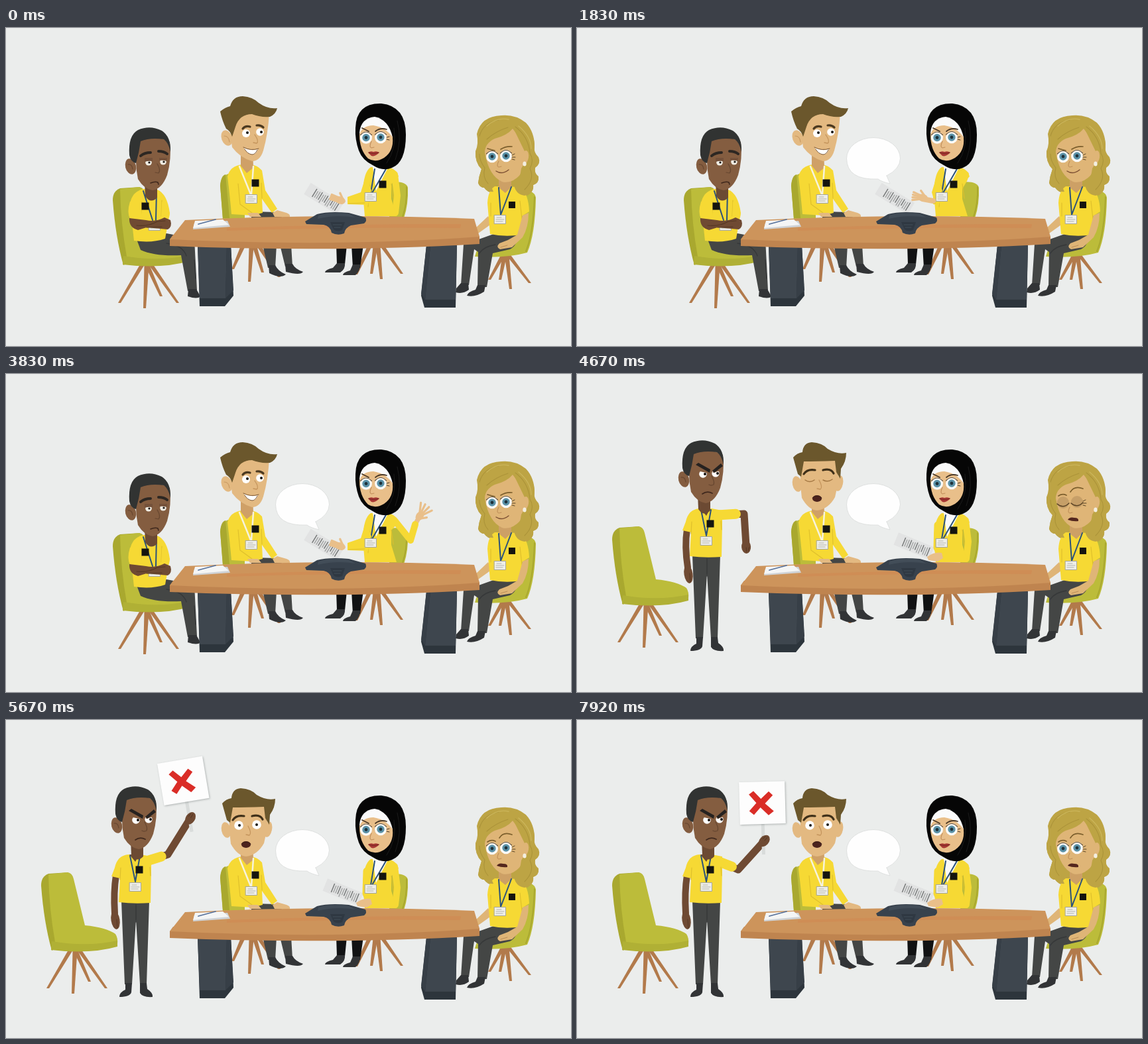
Animation, 852 px wide and 480 px high, one loop 8 s. Source, as an HTML page with a canvas:

```html
<!DOCTYPE html>
<html lang="en">
<head>
<meta charset="utf-8">
<title>Team meeting</title>
<style>
html, body { margin: 0; width: 100%; height: 100%; overflow: hidden; background: #ebedec; }
canvas { display: block; width: 100vw; height: 100vh; }
</style>
</head>
<body>
<canvas id="stage"></canvas>
<script>
const W = 852, H = 480, LOOP = 8000, STAND = 4250;
const canvas = document.getElementById('stage');
const ctx = canvas.getContext('2d');
const dpr = window.devicePixelRatio || 1;
canvas.width = W * dpr;
canvas.height = H * dpr;

const YELLOW = '#f6d934', FOLD = '#dfc02c', PANTS = '#444645', SHOE = '#323436', NAVY = '#2c527a';
const BROWN = '#845d40', ARM = '#6f4a33', TAN = '#e3b981', FAIR = '#e9bf8a', GOLD = '#dfb577';
const GREEN = '#bcbc3a', GREEN_DARK = '#a9a82f', WOOD = '#b27a4b', HAIR = '#bda444';

// Drawing helpers
function fill(color, d) {
  ctx.fillStyle = color;
  ctx.fill(new Path2D(d));
}
function line(color, width, d) {
  ctx.strokeStyle = color;
  ctx.lineWidth = width;
  ctx.lineCap = ctx.lineJoin = 'round';
  ctx.stroke(new Path2D(d));
}
function oval(color, x, y, rx, ry = rx, turn = 0) {
  ctx.fillStyle = color;
  ctx.beginPath();
  ctx.ellipse(x, y, rx, ry, turn, 0, Math.PI * 2);
  ctx.fill();
}
function at(x, y, turn, draw, scale = 1) {
  ctx.save();
  ctx.translate(x, y);
  ctx.rotate(turn);
  ctx.scale(scale, scale);
  draw();
  ctx.restore();
}

// Timing helpers
const lerp = (a, b, k) => a + (b - a) * k;
function ramp(t, from, to) {
  const k = Math.min(1, Math.max(0, (t - from) / (to - from)));
  return k * k * (3 - 2 * k);
}
function pose(t, keys) {
  let i = 0;
  while (i < keys.length - 2 && t >= keys[i + 1][0]) i++;
  const [t0, ...a] = keys[i], [t1, ...b] = keys[i + 1];
  const k = ramp(t, t0, t1);
  return a.map((v, n) => lerp(v, b[n], k));
}

// Shared parts
function badge(x, y) {
  ctx.fillStyle = '#eeeee8';
  ctx.fillRect(x - 8.5, y - 6.5, 17, 13);
  ctx.strokeStyle = '#a5a69f';
  ctx.lineWidth = 1;
  ctx.strokeRect(x - 8.5, y - 6.5, 17, 13);
  line('#b4b5b0', 1, `M${x - 5} ${y - 3}h7M${x - 6} ${y}h12M${x - 6} ${y + 3}h10`);
}
function emblem(x, y, size = 11) {
  ctx.fillStyle = '#15150f';
  ctx.fillRect(x - size / 2, y - size / 2, size, size);
}
function leg(x1, y1, x2, y2) {
  fill(WOOD, `M${x1 - 3.5} ${y1}H${x1 + 3.5}L${x2 + 2} ${y2}H${x2 - 2}Z`);
}
function hand(x, y, turn, spread, skin, reach = 12) {
  at(x, y, turn, () => {
    oval(skin, 0, 0, 8, 5.5);
    for (let i = -1.5; i <= 1.5; i++) {
      const a = i * spread;
      line(skin, 3.2, `M4 ${i * 2}L${5 + reach * Math.cos(a)} ${i * 2 + reach * Math.sin(a)}`);
    }
    line(skin, 3.2, 'M-2 4L4 10');
  });
}
function bigEye(x, y, shut) {
  if (shut) {
    oval('#c69f68', x, y, 9, 9);
    line('#5b4426', 1.5, `M${x - 9} ${y + 2}Q${x} ${y + 10} ${x + 9} ${y + 1}`);
    return;
  }
  oval('#fbfbf8', x, y, 9, 9.2);
  oval('#5b92a8', x, y, 5.7);
  oval('#20323a', x, y, 2.4);
  line('#594631', 1.1, `M${x - 8.5} ${y - 4}Q${x} ${y - 13} ${x + 8.5} ${y - 4}`);
}

function sideChair(x, y) {
  at(x, y, 0, () => {
    leg(105, 348, 126, 395);
    leg(97, 348, 63, 405);
    leg(104, 349, 101, 413);
    leg(111, 348, 151, 405);
    fill(GREEN_DARK, 'M53 250Q53 236 64 232L94 230L104 330L69 348Q57 305 53 250Z');
    fill(GREEN, 'M64 233L93 230Q100 231 102 240L119 310Q151 313 165 323Q169 329 168 338Q124 350 74 335Q65 285 64 233Z');
    fill('#b0b035', 'M69 334Q121 343 168 333V342Q126 354 68 347Z');
  });
}

function darkHead(x, y, angry) {
  at(x, y, 0, () => {
    fill('#6c4a33', 'M182 181L201 182L201 206Q191 216 183 204Z');
    oval(BROWN, 161, 159, 8, 12, -0.25);
    line('#674730', 1.2, 'M157 156Q163 155 164 163');
    fill(BROWN, 'M172 122Q166 151 172 178Q181 193 194 195Q208 193 216 172Q223 147 220 122Q198 109 172 122Z');
    fill('#313332', 'M159 142Q157 112 172 104Q190 96 208 105Q222 114 221 137Q218 123 211 118Q190 115 176 121Q174 137 169 154Q161 152 159 142Z');
    if (angry) {
      oval('#fff', 190, 151, 5.8);
      oval('#fff', 209, 150, 5.6);
      fill(BROWN, 'M181 141L202 149L199 150L181 146ZM204 148L217 141L216 146L206 149Z');
      oval('#16110d', 193, 151, 2);
      oval('#16110d', 212, 150, 2);
      fill('#262220', 'M179 137L183 134L201 144L200 149ZM204 146L217 135L220 139L207 149Z');
      line('#674730', 1.3, 'M203 154Q208 163 206 167Q202 169 199 167');
      line('#3f281d', 1.7, 'M189 181Q196 176 204 180');
    } else {
      oval('#f0ede4', 188, 153, 4.8, 4.6);
      oval('#f0ede4', 210, 152, 4.8, 4.6);
      fill('#74513a', 'M182 146H194V151Q188 150 182 152ZM204 146H216V151Q210 149 204 150Z');
      oval('#16110d', 189, 153, 1.6);
      oval('#16110d', 211, 152, 1.6);
      line('#2d2722', 4, 'M176 143Q182 138 191 138M203 136Q211 136 216 140');
      line('#674730', 1.2, 'M201 155Q207 165 203 169L198 168');
      line('#3f281d', 1.6, 'M191 184Q198 181 202 183L203 186');
    }
  });
}

function seatedMan() {
  sideChair(108, 10);
  fill(PANTS, 'M197 319L242 310L284 318L288 396L274 397L264 343Q225 345 203 335Z');
  line('#363839', 1.4, 'M242 325Q267 328 272 344M284 350L286 378');
  fill(SHOE, 'M275 394L287 394L293 405Q289 410 274 405Z');
  fill(YELLOW, 'M207 243Q190 247 187 265L193 321Q220 325 240 318L247 279Q243 250 228 244Z');
  line(FOLD, 1.2, 'M205 262L203 287M235 260L234 284');
  line(NAVY, 2, 'M207 246L221 290M227 246L226 290');
  badge(224, 299);
  emblem(210, 269);
  fill(YELLOW, 'M187 262Q182 278 187 288L204 290L204 262ZM235 262L247 279L246 286L234 288Z');
  fill(ARM, 'M186 287Q185 301 199 305L212 301L244 304Q251 300 248 290L239 286Q226 293 211 290Z');
  line('#553723', 1.2, 'M197 298Q215 300 228 292L240 291M212 301L235 300');
  darkHead(27, 50, false);
}

function sign(x, y, turn, scale) {
  at(x, y, turn, () => {
    ctx.fillStyle = '#d9dcdb';
    ctx.fillRect(-2.5, -30, 5, 49);
    ctx.save();
    ctx.shadowColor = 'rgba(60,70,70,.35)';
    ctx.shadowBlur = 3 * dpr;
    ctx.shadowOffsetX = ctx.shadowOffsetY = dpr;
    ctx.fillStyle = '#fdfdfd';
    ctx.fillRect(-34.5, -91, 69, 64);
    ctx.restore();
    fill('#da2d27', 'M-20 -72L-13 -77L-2 -65L10 -76L16 -70L4 -58L17 -46L9 -40L-3 -52L-13 -41L-20 -47L-9 -59Z');
  }, scale);
}

function standingMan(t) {
  sideChair(0, 0);
  const [ex, ey, hx, hy, turn] = pose(t, [
    [4250, 224, 246, 230, 290, -30], [4600, 252, 211, 255, 259, -30],
    [5060, 252, 211, 255, 259, -30], [5420, 243, 200, 276, 143, -14],
    [5670, 244, 203, 277, 150, -9.5], [5880, 243, 226, 281, 184, -1.5],
    [LOOP, 243, 226, 281, 184, -1.5]
  ]);
  const lift = ramp(t, 5000, 5350);

  line(ARM, 10, `M166 234Q162 260 ${lerp(167, 164, lift)} 292`);
  oval(ARM, lerp(168, 165, lift), 302, 6.5, 14, -0.15);
  line('#553723', 1, `M${lerp(170, 167, lift)} 301l1 13`);
  fill(PANTS, 'M174 273L216 273L212 399L202 399L196 301L190 399L179 399Z');
  line('#363839', 1.5, 'M196 279V305');
  fill(SHOE, 'M180 397H190L189 411Q187 418 171 418Q171 411 180 407ZM202 397H212L213 406Q222 412 221 418Q206 419 202 412Z');

  line(ARM, 11, `M215 213L${ex} ${ey}L${hx} ${hy}`);
  const sx = lerp(215, ex, 0.66), sy = lerp(212, ey, 0.66);
  line(YELLOW, 15, `M212 213L${sx} ${sy}`);
  fill(YELLOW, 'M185 203Q168 204 164 223L159 236L172 239L170 275Q193 278 218 276L219 226L219 206L203 203Z');
  line(FOLD, 1.2, 'M173 223L172 241M217 222L218 235');
  fill('#6c4a33', 'M186 203H201L195 214Z');
  line(NAVY, 2, 'M187 205L195 244M202 205L195 244');
  badge(195, 252);
  emblem(201, 226);
  darkHead(6 * lift, 0, true);
  if (t >= 5080) sign(hx, hy, turn * Math.PI / 180, ramp(t, 5060, 5300));
  at(hx, hy, Math.atan2(hy - ey, hx - ex), () => {
    oval(ARM, 2, 0, 10, 7);
    line('#553723', 1, 'M3 -4L8 -3M3 0L9 0');
  });
}

function officeMan(shocked, blink) {
  leg(357, 330, 342, 364);
  leg(370, 330, 367, 383);
  leg(375, 330, 387, 369);
  leg(382, 330, 412, 376);
  fill(GREEN, 'M323 238Q324 222 339 219L360 218V290H327Z');
  fill(GREEN_DARK, 'M323 238Q324 223 331 221L337 287H327Z');
  fill(PANTS, 'M370 277L409 278L418 288H370ZM387 327H408L406 362H395ZM413 327H430L432 360H421Z');
  fill(SHOE, 'M396 358H406Q410 367 422 372Q414 379 397 370ZM421 356H432Q436 364 448 368Q444 374 422 368Z');
  fill(YELLOW, 'M356 206Q338 208 334 224Q338 258 340 281L372 283L387 279L386 258L401 279L409 273L391 245L386 215Q379 207 369 206Z');
  line(FOLD, 1.2, 'M350 235L353 266L371 279M385 234L386 257');
  fill(TAN, 'M364 279L380 279L385 285H368ZM402 279L409 275L423 279Q429 281 428 285L405 285Z');
  fill('#cfa067', 'M354 181H372L373 211L363 219L354 208Z');
  line('#f7f3dc', 2.5, 'M352 209L369 251M373 209L370 251');
  badge(370, 258);
  emblem(376, 234);

  if (shocked) {
    oval(TAN, 332, 166, 7, 12, -0.2);
    oval(TAN, 395, 165, 6, 12, 0.2);
    fill(TAN, 'M338 128Q335 158 339 187Q349 205 362 206Q379 204 389 186Q396 160 394 128Z');
    fill('#6b572c', 'M326 126Q332 119 340 118Q341 104 354 103Q370 104 378 113Q393 122 406 119Q406 132 398 143L397 158L391 148L389 131Q360 132 342 132L338 155L333 151Z');
    if (blink) {
      line('#a57843', 1.5, 'M344 160Q351 165 358 160M371 160Q378 164 385 159');
    } else {
      oval('#fff', 351, 159, 6.8);
      oval('#fff', 378, 158, 6.8);
      oval('#17130e', 352, 159, 2);
      oval('#17130e', 378, 158, 2);
    }
    line('#3f3019', 3.2, 'M342 151Q347 143 359 145M371 145Q383 142 387 150');
    line('#c4945c', 1.3, 'M365 160Q371 171 367 174L362 173');
    oval('#4c231d', 362, 188, 7, 5);
    line('#3d2017', 1, 'M355 187Q362 181 369 187');
  } else {
    oval(TAN, 333, 166, 8, 12, -0.35);
    line('#c99a63', 1.2, 'M329 163Q336 163 337 172');
    fill(TAN, 'M342 130Q337 159 341 180Q353 196 371 201Q383 201 388 185Q395 161 397 128Z');
    fill('#6b572c', 'M323 126Q330 120 338 118Q342 103 357 103Q372 104 381 113Q395 123 409 121Q407 130 398 134Q383 135 371 130Q352 130 346 149L341 164Q338 155 332 152Q326 140 323 126Z');
    oval('#fff', 362, 159, 6);
    oval('#fff', 383, 157, 5.8);
    oval('#17130e', 364, 158, 2);
    oval('#17130e', 385, 157, 2);
    line('#4b3920', 3.2, 'M357 152Q361 147 368 149M378 147Q384 146 388 150');
    line('#c4945c', 1.3, 'M375 161Q382 171 378 174L373 173');
    fill('#fff', 'M359 181Q369 186 380 183Q377 192 370 191Q362 189 359 181Z');
    line('#7a5634', 1, 'M358 180Q369 186 381 182M360 183Q364 190 371 191Q376 191 379 184');
  }
}

function report(x, y, turn) {
  at(x, y, turn, () => {
    ctx.fillStyle = '#e2e3e3';
    ctx.fillRect(-30, -10, 58, 20);
    for (let i = 0; i < 13; i++) {
      ctx.fillStyle = i % 3 ? '#a1a3a3' : '#717474';
      ctx.fillRect(-18 + i * 3.3, -7 + (i * 5) % 3, 1.4, 14 - (i * 7) % 4);
    }
  });
}

function speaker(t) {
  const late = t >= STAND;
  const open = late ? 0 : ramp(t, 1350, 1650) * (1 - ramp(t, 2350, 2700));
  const wave = late ? 0 : ramp(t, 3050, 3400);
  leg(548, 330, 528, 372);
  leg(557, 330, 551, 371);
  leg(561, 330, 566, 379);
  leg(568, 330, 597, 371);
  fill(GREEN, 'M578 233Q603 230 606 241Q607 266 600 287H578Z');
  line(GREEN_DARK, 2, 'M604 240Q605 265 598 285');
  fill('#111213', 'M498 327H514L511 357H499ZM521 327H539L534 362H523Z');
  fill(SHOE, 'M499 355H511Q512 364 504 369L481 369Q481 365 493 362ZM523 357H534Q534 367 527 373L508 373Q508 369 519 366Z');

  // Far arm: at rest, tucked behind while the near hand opens, or raised
  const ex = lerp(lerp(590, 584, open), 610, wave), ey = lerp(lerp(253, 228, open), 251, wave);
  const hx = lerp(lerp(587, 577, open), 617, wave), hy = lerp(lerp(279, 240, open), 227, wave);
  if (wave > 0.05) {
    const sway = Math.sin((t - 3830) / 130) * 0.12 * wave;
    hand(hx + 7 * wave, hy - 13 * wave, lerp(1.5, -0.95, wave) + sway, 0.36, FAIR, 14);
    line(FAIR, 7, `M${hx} ${hy}l${6 * wave} ${-11 * wave}`);
  }
  line(YELLOW, 10, `M586 221L${ex} ${ey}L${hx} ${hy}`);
  fill(YELLOW, 'M550 210Q539 217 538 249L541 284H589L581 258L581 236L592 224Q589 214 580 211Z');
  line(FOLD, 1.1, 'M581 235L584 257M549 237L546 270');
  fill('#fafafa', 'M553 209H577L558 246Z');
  line(NAVY, 2, 'M556 213L550 249M574 211L552 249');
  badge(550, 255);
  emblem(568, 236);

  fill('#060606', 'M527 151Q528 113 566 114Q603 118 603 161Q603 203 582 211Q568 217 553 207Q537 199 532 185Q526 168 527 151Z');
  line('#1b1b1b', 1, 'M585 151Q590 180 574 204M590 140Q598 170 587 199');
  fill('#fafafa', 'M533 158Q535 136 556 134Q577 138 583 165L570 170H535Z');
  fill(FAIR, 'M533 161Q537 147 554 147Q573 150 583 165Q585 186 570 196Q557 204 546 197Q533 184 533 161Z');
  bigEye(543, 165.5, false);
  bigEye(565, 165, false);
  line('#4a3826', 1.8, 'M537 151L547 156M557 156Q564 150 574 153');
  line('#4a3826', 1, 'M574 165L578 164M574 168L578 169');
  line('#c28f5c', 1.2, 'M551 171Q547 180 551 181L555 180');
  fill('#a83834', 'M546 188Q550 185 554 187Q559 185 563 188Q556 195 551 193Z');
  line('#72251f', 1, 'M547 188Q554 191 562 188');

  if (late) {
    report(509, 260, 0.39);
    line(YELLOW, 11, 'M544 228L543 262L548 272');
    badge(550, 255);
    fill(FAIR, 'M528 276Q539 268 550 270L552 278L544 283L530 281Z');
    return;
  }
  report(480, 258, 0.55);
  const cuff = lerp(515, 537, open);
  fill(YELLOW, `M543 222L535 248L${cuff} 255L${cuff} 266L546 267L551 245Z`);
  line(FOLD, 1, `M${cuff + 2} 265L541 264`);
  badge(550, 255);
  if (open > 0.05) line(FAIR, 8, `M${cuff} 261L${cuff - 16 * open} 258`);
  hand(lerp(504, 521, open), lerp(260, 256, open), lerp(3.5, 3.3, open), lerp(0.04, 0.2, open), FAIR, 10);
}

function blonde(upset, blink) {
  leg(750, 342, 729, 380);
  leg(752, 342, 745, 380);
  leg(755, 342, 761, 394);
  leg(757, 342, 790, 385);
  fill(GREEN, 'M772 245Q797 243 799 256Q798 312 786 339Q753 348 707 345L714 323L768 320Z');
  line(GREEN_DARK, 2, 'M797 255Q795 311 784 337');
  fill(PANTS, 'M710 320L738 310L770 312Q772 328 760 334L734 340L725 391H711L712 338L706 334L698 388H686L690 326Z');
  line('#363839', 1.3, 'M714 340Q720 330 738 327');
  fill(SHOE, 'M686 385H697L698 395Q689 402 678 399L679 393ZM711 388H723L721 398Q707 407 695 404Q697 398 708 395Z');
  fill(GOLD, 'M727 284L733 295L712 310L708 302Z');
  fill(HAIR, 'M747 132Q716 133 710 160Q713 175 708 186Q707 203 717 213Q713 224 712 234Q717 242 721 241Q727 250 737 248L761 237Q767 256 781 255Q797 249 795 237Q804 234 803 224Q796 219 798 210Q807 205 803 195Q795 187 797 179Q797 157 784 143Q768 130 747 132Z');
  fill(YELLOW, 'M737 239Q727 245 726 264L730 311Q753 316 777 312L778 284L789 277Q788 251 776 240Z');
  line(FOLD, 1.2, 'M775 261L778 288M731 264L731 284');
  fill(GOLD, 'M779 283L788 279Q788 301 779 316L763 331L745 334Q738 331 744 325L757 320L771 312Z');
  line('#b98d58', 1, 'M746 331L756 328');
  fill('#cda066', 'M743 225H762V240L753 249L743 241Z');
  line(NAVY, 2, 'M743 241L746 282M762 240L746 282');
  badge(745, 289);
  emblem(763, 267, 10);
  fill(GOLD, 'M722 188Q722 174 737 167Q756 162 764 152Q777 167 783 187Q784 208 776 221Q762 236 748 232Q728 223 722 188Z');
  fill(HAIR, 'M764 149L783 145Q798 163 797 180Q795 188 803 196Q806 206 798 211Q796 219 803 225Q804 234 795 237Q796 250 782 253Q768 251 766 236Q776 226 777 212L783 202L782 186ZM722 178Q717 193 724 211Q736 224 730 236L735 247Q727 248 721 241Q714 241 712 234Q713 224 717 213Q707 203 708 186Z');
  oval(GOLD, 783, 195, 5, 10, 0.15);
  line('#ab9339', 1.1, 'M714 163Q720 142 743 139M725 168Q738 156 757 150M768 149Q788 164 790 189Q797 200 790 212Q798 228 782 244M714 190Q714 201 722 211Q718 225 727 235');
  line('#cbb55a', 1.4, 'M725 148Q740 134 758 138M773 148Q792 164 792 182');
  oval('#f3eee0', 782, 205, 2.7, 3.5);
  bigEye(733, 194, blink);
  bigEye(754, 193, blink);
  line('#594527', 1, 'M763 192L767 190M763 195L768 195M763 198L767 199');
  line('#c0905a', 1.2, 'M743 201Q739 209 743 210L747 209');
  if (upset) {
    line('#7b5e2c', 1.7, 'M726 184Q732 180 738 183M744 178Q750 168 763 173');
    fill('#54271e', 'M740 220Q743 215 750 217Q757 217 756 222Q748 223 740 220Z');
  } else {
    line('#7b5e2c', 1.7, 'M726 182L737 185M746 183Q754 178 763 179');
    line('#7d5033', 1.4, 'M739 216Q748 222 758 214');
  }
}

function table() {
  fill('#2d353c', 'M289 328H339L343 404L330 420H292Z');
  fill('#3e464e', 'M289 328H333L331 408H292Z');
  fill('#373f47', 'M333 328H339L343 396L331 408Z');
  fill('#2d353c', 'M634 328H680L678 422H631L626 404Z');
  fill('#3e464e', 'M640 328H680L678 410H632Z');
  fill('#373f47', 'M634 328H640L632 410L626 401Z');
  fill('#bf844f', 'M247 319L252 312L709 305L714 315V326Q500 339 247 329Z');
  fill('#cd945b', 'M270 290Q490 279 706 288L714 315Q500 331 247 319Z');
  fill('#cf8d55', 'M333 302Q517 295 686 296L685 302Q510 300 333 306Z');
  fill('#cfd3d7', 'M284 294L334 291L338 300L282 304Z');
  fill('#f4f5f5', 'M285 291L327 289L336 297L282 302Z');
  line('#55709a', 1.8, 'M290 296L316 289');
  fill('#38424d', 'M451 292L469 281Q487 276 517 279L542 286Q545 291 540 295L520 298Q511 302 510 310Q500 314 491 309Q489 299 479 297L453 296Z');
  fill('#424d58', 'M471 283Q493 276 518 281L527 286Q498 281 470 288Z');
  fill('#2f3842', 'M489 293L511 293L507 305Q499 308 494 304Z');
  line('#48535e', 0.8, 'M493 297H506M495 301H504');
}

function bubble(t) {
  const size = ramp(t, 920, 1150);
  if (!size) return;
  at(472, 235, 0, () => {
    const d = 'M-5 -12L0 0Q-13 -3 -18 -7Q-65 -5 -65.5 -38A40.5 31.5 0 0 1 15.5 -38Q15 -22 -5 -12Z';
    fill('#fefefe', d);
    line('#dfe1e0', 1, d);
  }, size);
}

function draw(t) {
  const late = t >= STAND;
  const blink = t >= 4580 && t < 4760;
  ctx.setTransform(dpr, 0, 0, dpr, 0, 0);
  ctx.fillStyle = '#ebedec';
  ctx.fillRect(0, 0, W, H);
  if (!late) seatedMan();
  officeMan(late, blink);
  speaker(t);
  blonde(late, blink);
  table();
  bubble(t);
  if (late) standingMan(t);
}

const start = performance.now();
function tick() {
  draw((performance.now() - start) % LOOP);
  requestAnimationFrame(tick);
}
tick();
</script>
</body>
</html>
```
